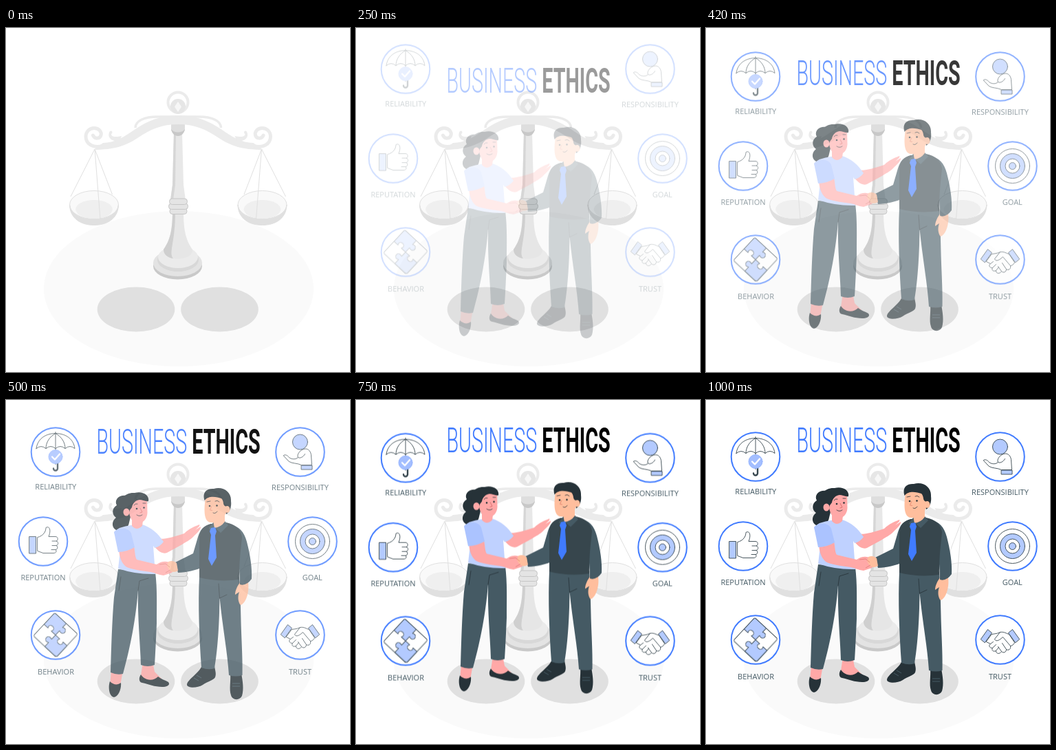
An HTML page without scripts for the animation above (1040 ms loop, 500 by 500 pixels).

```html
<!DOCTYPE html>
<html lang="en">
<head>
<meta charset="utf-8">
<title>Business Ethics</title>
<style>
html, body { margin: 0; width: 100%; height: 100%; overflow: hidden; background: #fff; }
svg { display: block; width: 100%; height: 100%; }

.show { animation: show 1040ms step-end infinite; }
.up { --from: 30px; }
.down { --from: -30px; }
.up, .down { animation: slide 1040ms infinite; }
.title { animation: rise 1040ms linear infinite; }

@keyframes show {
  0% { visibility: hidden; }
  7.69%, 100% { visibility: visible; }
}
@keyframes slide {
  0% { opacity: 0; transform: translateY(var(--from)); animation-timing-function: cubic-bezier(.36, -.01, .5, 1.38); }
  94%, 100% { opacity: 1; transform: none; }
}
@keyframes rise {
  0%, 7% { opacity: 0; transform: translateY(30px); }
  16.35% { opacity: .21; transform: translateY(24px); }
  40.4% { opacity: .78; transform: translateY(7px); }
  52%, 100% { opacity: 1; transform: none; }
}

.title text { font: 300 50px Roboto, "Liberation Sans", sans-serif; }
.title .bold { font-weight: 700; }
.label { font: 11px "Open Sans", "Noto Sans", sans-serif; fill: #455a64; text-anchor: middle; }
.ring { fill: #fff; stroke: #407bff; stroke-width: 2; }
.ico { fill: #fff; stroke: #37474f; stroke-width: .9; stroke-linejoin: round; stroke-linecap: round; }
.tint { fill: #b3caff; }
.none { fill: none; }
.dark { fill: #263238; }
.slate { fill: #455a64; }
.vest { fill: #37464d; }
.rose { fill: #ffa8a7; }
.peach { fill: #ffbe9d; }
.shirt { fill: #bfd1ff; }
.sleeve { fill: #abc3ff; }
.fold { fill: none; stroke: #263238; stroke-width: .8; stroke-linecap: round; }
</style>
</head>
<body>
<svg viewBox="0 0 500 500" xmlns="http://www.w3.org/2000/svg">
  <defs>
    <circle id="ring" class="ring" r="35.3"/>
    <g id="arm">
      <g fill="none" stroke="#e0e0e0">
        <ellipse cx="128" cy="257" rx="35.5" ry="20.5" fill="#f9f9f9"/>
        <path d="M101 264a27 14 0 0 1 54 0c-2 8-12 13-27 13s-25-5-27-13z" fill="#efefef" stroke="none"/>
        <path d="M129 176L94 245M129 176L154.500 242M129 176L137 278"/>
        <path d="M92.500 257C93 277 109 286.500 128 286.500S163 277 163.500 257C162 270 148 278 128 278S94 270 92.500 257z" fill="#e0e0e0"/>
      </g>
      <g fill="#ebebeb">
        <path d="M250.500 127C224 127 206 135 188 147C172 158 158 167 141 167L127 177C158 177 174 171 191 160C210 147 226 140 250.500 140z"/>
        <path d="M165 164C153 166 146 158 151 150C154 148 156 152 153 154C153 158 158 159 168 157z"/>
        <path d="M141 171C127 176 116 168 116 158C116 150 122 145.500 128 145.500C135 145.500 139.500 151 138 156C136.500 161 129 162 126.500 156" fill="none" stroke="#ebebeb" stroke-width="5" stroke-linecap="round"/>
        <path d="M188 145C188 135 201 129 220 129H250" fill="none" stroke="#ebebeb" stroke-width="3.500"/>
      </g>
    </g>
    <g id="cuff"><path class="tint" d="M-28-1L-18-15L-12-10L-22 4z"/></g>
  </defs>

  <!-- floor and balance -->
  <ellipse cx="251" cy="379" rx="196" ry="113" fill="#fafafa"/>
  <ellipse cx="189" cy="409" rx="56.300" ry="32.500" fill="#e0e0e0"/>
  <ellipse cx="310.500" cy="409" rx="56.300" ry="32.500" fill="#e0e0e0"/>
  <ellipse cx="249.500" cy="346" rx="35.500" ry="19.500" fill="#c9c9c9"/>
  <ellipse cx="249.500" cy="341.500" rx="35.500" ry="19.500" fill="#e3e3e3"/>
  <ellipse cx="250" cy="337" rx="30" ry="17" fill="#d8d8d8"/>
  <ellipse cx="250" cy="333" rx="29" ry="16" fill="#ebebeb"/>
  <path d="M242 268C242 295 238 309 229 322C227 340 272 340 271 322C262 309 258 295 258 268z" fill="#e6e6e6"/>
  <path d="M242 268C242 295 238 309 229 322C229 329 235 334 243 335C236 326 246 312 246 268z" fill="#cfcfcf"/>
  <path d="M244 152H256L258 228L261 250H239L242 228z" fill="#e8e8e8"/>
  <path d="M244 152H247L246 228L243 250H239L242 228z" fill="#d6d6d6"/>
  <g fill="#e4e4e4" stroke="#c6c6c6">
    <rect x="238" y="262" width="25" height="8.500" rx="4"/>
    <rect x="236.500" y="255" width="28" height="8.500" rx="4"/>
    <rect x="237.500" y="248" width="26" height="8.500" rx="4"/>
  </g>
  <path d="M240 138H260V148C258 153 255 157 250 157S242 153 240 148z" fill="#dedede"/>
  <path d="M240 147C244 153 256 153 260 147C259 153 255 157 250 157S241 153 240 147z" fill="#c8c8c8"/>
  <use href="#arm"/>
  <use href="#arm" transform="translate(500.500) scale(-1 1)"/>
  <circle cx="250" cy="108" r="14.500" fill="none" stroke="#ebebeb" stroke-width="4"/>
  <circle cx="250" cy="114" r="11" fill="#e6e6e6"/>
  <path d="M250 107L255 114.500L250 122L245 114.500z" fill="#f7f7f7"/>

  <g class="show">
    <!-- people -->
    <g class="up">
      <!-- man -->
      <path class="dark" d="M284 381C279 391 263 400 263 407C264 412 278 412 286 407C293 402 302 400 304 396C306 391 304 386 303 380zM326 390C327 402 324 413 327 422C329 430 340 430 343 423C346 413 344 402 342 390z"/>
      <path fill="none" stroke="#455a64" d="M277 393L284 397M273 397L280 401M329 405H340M329 409H340"/>
      <path class="slate" d="M281 250H339C341 275 341 300 342 330C343 355 344 375 343.500 393Q334 396 324 393C322 360 315 325 310.500 280C310 325 307 360 303 383Q294 386 284 382C281 340 279 290 281 250z"/>
      <path class="fold" d="M310.500 281L309 260M310.500 281L321 276"/>
      <path class="peach" d="M342 256C336 263 333 270 333 276L339 272C336 280 338 288 341 291C348 289 354 274 352 258z"/>
      <path class="slate" d="M326 174C339 177 346 184 350 199C355 218 358 238 357 253Q349 264 340 261L338 215z"/>
      <path class="slate" d="M298 173C286 176 282 183 279 192L272 216L246 229L250 244C262 244 277 240 286 236L294 204z"/>
      <path class="vest" d="M298 173L320 171C333 174 341 180 343 192C342 205 339 222 339 254Q309 258 281 251L281 192C282 181 287 176 298 173z"/>
      <path class="slate" d="M295 179L302 170L318 169L323 175L312 186L304 179L298 187z"/>
      <path class="peach" d="M300 163L318 158V170Q312 178 303 179z"/>
      <path fill="#407bff" d="M298 179L304 178L306 184L304 190L306 222L299 234L294 224L298 189L296 184z"/>
      <path class="peach" d="M289.500 138C288 152 287 169 297 171C307 172 317 167 319 158C326 158 328 149 321 147L319 132L296 127z"/>
      <path class="dark" d="M288.500 139C285 128 291 121 302 122C316 118 328 127 327 140C328 147 326 155 320 159C319 155 323 148 318 147C315 145 317 140 313 136C306 134 295 131 288.500 139z"/>
      <ellipse class="peach" cx="321.500" cy="152" rx="4" ry="5"/>
      <circle class="dark" cx="296" cy="147" r="1.300"/>
      <circle class="dark" cx="306.500" cy="146.500" r="1.300"/>
      <path class="fold" stroke-width="1.200" d="M292 141L297 140M304 140Q307 138 310 141M301 157Q304 159 307 155"/>
      <path d="M299 147L296.500 153L300 153.500" fill="none" stroke="#e58b72" stroke-width=".9"/>
      <!-- woman -->
      <path class="dark" d="M176 132C163 130 157 139 161 146C153 151 154 160 160 164C152 170 154 181 163 183C170 184 178 179 179 171L184 150z"/>
      <path class="rose" d="M214 193C226 197 238 194 259 187C266 180 274 177 281 174C283 176 277 180 275 182L283 177C284 181 276 188 272 192C267 197 262 199 256 203L234 215C226 218 218 210 214 203z"/>
      <path class="rose" d="M153 386H170L166 408H151zM199 373H213L216 388L226 398L205 402L196 394z"/>
      <path class="dark" d="M151 402C148 411 150 424 157 425C164 424 168 412 167 404C162 408 156 407 151 402zM196 392C192 398 194 404 198 404C207 406 216 410 227 410C235 410 239 407 236 403C231 400 226 399 221 395C217 399 211 401 205 399Q199 397 196 392z"/>
      <path class="slate" d="M163 239L217 243C220 268 219 290 219 318C218 342 217 362 216 378Q206 382 196 378C195 345 191 310 192 269C188 320 178 362 170 391Q161 393 152 389C153 355 154 315 157 280z"/>
      <path class="fold" d="M192 270L194 256L207 252M167 250L164 270"/>
      <path class="shirt" d="M182 175L198 174C211 178 221 187 229 199Q224 206 216 208L214 205L217 246Q190 247 163 238L166 212L157 185Q164 177 182 175z"/>
      <path class="rose" d="M183 166L200 162L198 176Q190 184 183 176z"/>
      <path class="rose" d="M164 211L186 206C188 214 187 220 190 225L219 232C226 227 234 226 241 231L247 237L241 244L229 248C221 247 216 244 210 243C195 241 181 239 174 235C167 229 165 220 164 211z"/>
      <path class="sleeve" d="M157 185C163 178 177 177 182 187L187 207Q175 214 163 214z"/>
      <path class="peach" d="M236 228Q243 225 248 230L250 241Q244 245 238 241L234 234z"/>
      <path fill="none" stroke="#e07873" stroke-width=".8" d="M223 232L232 231L238 236M232 244L239 240"/>
      <path class="rose" d="M180 140C177 153 179 168 188 171C198 174 205 167 205.500 157L205 136L190 131z"/>
      <path class="dark" d="M169 152C164 137 173 127 187 128C198 125 209 131 207 140C203 141 198 138 194 138C188 139 184 143 183 149L180 153L177 164C172 163 168 158 169 152z"/>
      <ellipse class="rose" cx="175" cy="156" rx="4.500" ry="5.500"/>
      <circle class="dark" cx="190" cy="151" r="1.300"/>
      <circle class="dark" cx="200.500" cy="149.500" r="1.300"/>
      <path class="fold" stroke-width="1.200" d="M186 146Q188 143 191 144M199 143L203 143M190 160Q194 163 198 160"/>
      <path d="M195 150L198 156L194.500 157" fill="none" stroke="#d96b69" stroke-width=".9"/>
    </g>

    <!-- badges -->
    <g class="down">
      <g class="ico" transform="translate(72 82.500)">
        <use href="#ring"/>
        <path d="M0-29V18"/>
        <path d="M-28-5C-26-21-12-27 0-27S26-21 28-5q-7-6-14 0q-7-6-14 0q-7-6-14 0q-7-6-14 0z"/>
        <path class="none" d="M0-27C-9-22-14-14-14-5M0-27V-5M0-27C9-22 14-14 14-5"/>
        <path class="none" stroke-width="2.400" d="M3 15V24a3 3 0 0 1-6 0"/>
        <circle r="10" cy="7" fill="#a3beff" stroke="#8fb0ff"/>
        <path class="none" stroke="#fff" stroke-width="2.400" d="M-5 7L-1 11L6 3"/>
      </g>
      <g class="ico" transform="translate(427.500 82.500)">
        <use href="#ring"/>
        <circle class="tint" cy="-14.500" r="11"/>
        <path d="M-24 5C-22 3-18 5-16 8C-12 11-6 11-3 8C-5 4-1-2 5-4C11-6 15-2 16 4L17 19H2C-4 16-12 17-16 14z"/>
        <path class="none" d="M-3 8C0 10 5 7 7 3"/>
        <rect class="tint" x="2" y="19.500" width="15.500" height="6"/>
      </g>
      <g class="ico" transform="translate(54 212.500)">
        <use href="#ring"/>
        <rect class="tint" x="-20" y="-7" width="9.500" height="24.500"/>
        <path d="M-8-6C0-8 4-14 4-20C9-23 12-17 8-7H18c4 0 4 6 1 6.500c4 1 3 6 0 6.500c3 1 2 6-1 6c2 2 1 5-3 5H0L-8 14z"/>
        <path class="none" d="M13-.5H19M13 6H19M12 12H18"/>
      </g>
      <g class="ico" transform="translate(445.500 212.500)">
        <use href="#ring"/>
        <circle r="25"/>
        <circle class="tint" r="18"/>
        <circle r="10.500"/>
        <circle class="tint" r="5"/>
      </g>
      <g class="ico" transform="translate(72 348.500)">
        <use href="#ring"/>
        <g transform="rotate(43) scale(1.060)">
          <rect x="-21.500" y="-21.500" width="43" height="43" rx="2"/>
          <path class="tint" d="M-19.500-21.500H0V-14c8-5 10 10 0 6V0H-8c5-8-11-8-6 0H-21.500V-19.500q0-2 2-2z"/>
          <path class="tint" d="M19.500 21.500H0V14c-8 5-10-10 0-6V0H8c-5 8 11 8 6 0H21.500V19.500q0 2-2 2z"/>
        </g>
      </g>
      <g class="ico" transform="translate(427.500 348.500)">
        <use href="#ring"/>
        <path d="M-12-8C-6-9-4-9 0-11C6-12 9-9 13-8L21 4C20 7 17 9 15 9C16 14 12 16 9 14C9 18 5 20 2 17C0 21-6 21-6 16C-10 18-13 15-11 12C-16 12-17 8-14 6L-20 3z"/>
        <path class="none" d="M0-11L-8-1C-6 4 0 0 4-4L15 9M3 5L9 14M-3 10L2 17M-14 6L-10 3M-11 12L-6 7M-6 16L-2 11"/>
        <use href="#cuff"/>
        <use href="#cuff" transform="scale(-1 1)"/>
      </g>
      <g class="label">
        <text x="72.300" y="136.500">RELIABILITY</text>
        <text x="427.500" y="137.500">RESPONSIBILITY</text>
        <text x="54" y="268.800">REPUTATION</text>
        <text x="445.300" y="268.800">GOAL</text>
        <text x="72.500" y="406">BEHAVIOR</text>
        <text x="427.500" y="406">TRUST</text>
      </g>
    </g>

    <g class="title">
      <g transform="scale(.575 1)">
        <text x="228.500" y="75.800" fill="#407bff">BUSINESS</text>
        <text class="bold" x="470" y="75.800">ETHICS</text>
      </g>
    </g>
  </g>
</svg>
</body>
</html>
```
